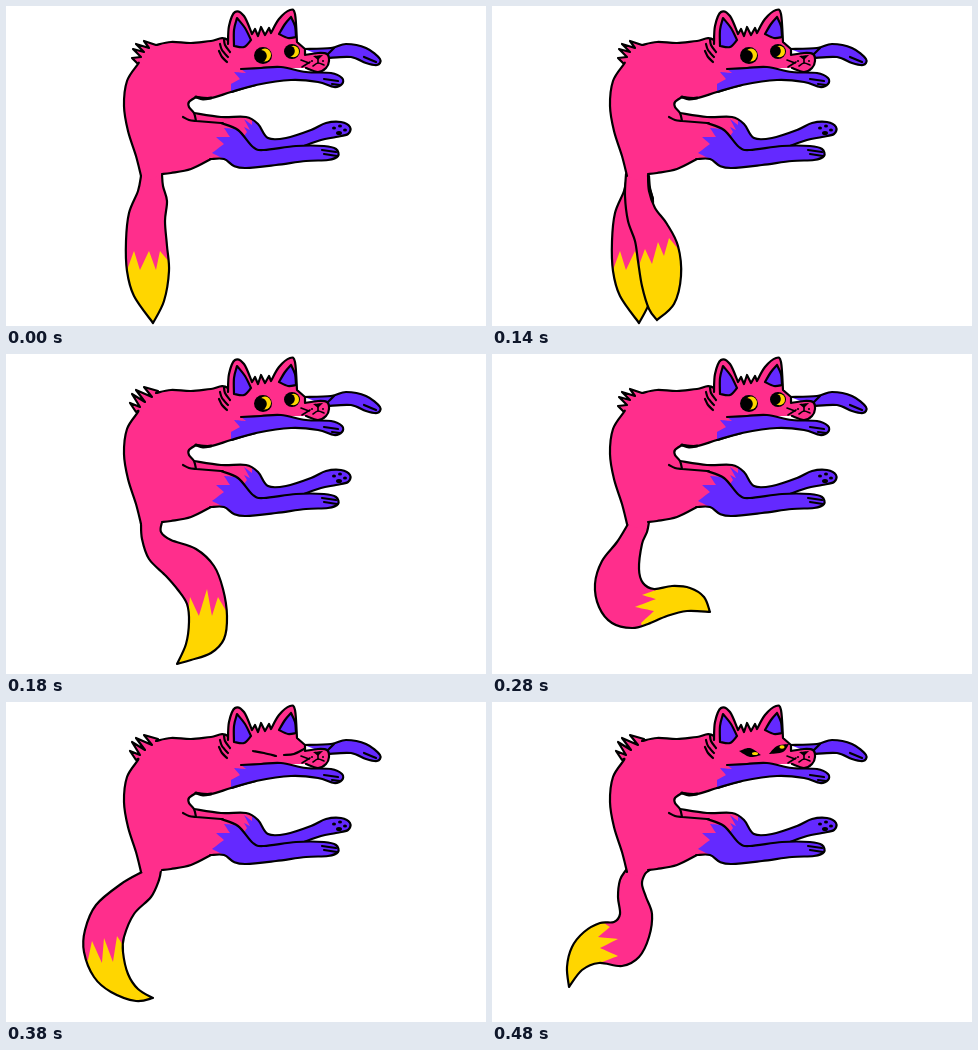
Write an HTML page with a canvas that moves like this. It is 480 px wide and 320 px high and loops after 0.58 s.

```html
<!DOCTYPE html>
<html lang="en">
<head>
<meta charset="utf-8">
<title>Stretching cat</title>
<style>
html, body { margin: 0; width: 100%; height: 100%; overflow: hidden; background: #fff; }
canvas { display: block; }
</style>
</head>
<body>
<canvas id="c" width="480" height="320"></canvas>
<script>
const g = document.getElementById('c').getContext('2d');
const PINK = '#ff2e8c', VIOLET = '#6429ff', GOLD = '#ffd600', INK = '#000';

// Smooth curve through "x y x y ..."; a slash marks a sharp corner.
function curve(text) {
  const path = new Path2D();
  let last = null;
  for (const part of text.split('/')) {
    const n = part.trim().split(/\s+/).map(Number), p = last ? [last] : [];
    for (let i = 0; i < n.length; i += 2) p.push([n[i], n[i + 1]]);
    if (!last) path.moveTo(...p[0]);
    for (let i = 0; i + 1 < p.length; i++) {
      const b = p[i], c = p[i + 1], a = p[i - 1] || b, d = p[i + 2] || c;
      path.bezierCurveTo(b[0] + (c[0] - a[0]) / 6, b[1] + (c[1] - a[1]) / 6,
        c[0] - (d[0] - b[0]) / 6, c[1] - (d[1] - b[1]) / 6, ...c);
    }
    last = p[p.length - 1];
  }
  return path;
}
function fill(text, color) {
  g.fillStyle = color;
  g.fill(curve(text));
}
function line(text, width = 2.2) {
  g.lineWidth = width;
  g.stroke(curve(text));
}
function lines(list, width) {
  for (const text of list) line(text, width);
}
function shape(text, color, width) {
  fill(text, color);
  line(text, width);
}
function dot(x, y, rx, ry, color) {
  g.fillStyle = color;
  g.beginPath();
  g.ellipse(x, y, rx, ry, 0, 0, 7);
  g.fill();
}

// Each tail is a list of [outline, coloured tip] layers, back to front.
const upright = ['135 170 132 185 123 207 120 235 121 265 128 290 147 317/158 295 163 265 161 240 159 215 161 195 157 180 156 168',
  '115 264/121 264/128 245/134 264/143 245/150 264/154 245/165 258/165 320/115 320'];
const tails = [
  [upright],
  [upright, ['134 168 133 190 136 215 143 235 146 255 150 280 157 303 165 314/182 298 189 270 186 240 175 218 163 202 157 185 156 168',
    '140 275/146 262/153 243/160 258/166 236/172 250/177 232/192 250/192 320/140 320']],
  [['135 168 136 185 143 205 160 222 172 236 181 250 183 268 180 290 171 310/185 306 205 299 218 285 221 262 217 235 208 212 190 195 165 186 155 178 156 168',
    '175 260/182 260/184 243/193 262/201 235/206 262/212 243/223 262/223 320/160 320']],
  [['136 170 125 188 110 207 103 230 107 253 120 269 140 274 156 270 175 262 195 257 218 258/212 243 198 234 180 232 162 235 151 229 147 215 150 190 155 178 157 168',
    '166 228/164 236/150 241/164 245/143 253/162 257/149 269/153 280/225 280/225 228']],
  [['136 170 115 182 90 203 79 228 78 250 88 275 105 290 130 299 147 296/132 287 122 272 117 250 118 235 128 212 145 195 153 178 155 168',
    '70 262/82 258/86 239/96 261/98 236/107 260/111 234/120 248/155 250/155 305/70 305']],
  [['134 168 128 178 126 195 128 212 122 220 108 221 92 230 80 245 75 265 77 285/90 268 107 261 130 264 147 255 157 235 160 212 154 195 150 182 153 172 158 168',
    '103 215/118 225/106 235/126 237/108 246/126 254/105 262/105 290/70 290/70 215']]
];
const tuftLow = '150 39/138 35/143 42/130 38/138 46/127 43/135 51/126 52/132 58';
const tuftHigh = '152 37/138 33/146 43/130 36/139 48/126 40/134 53/124 49/130 58';

const farArm = '298 43 325 42 340 38 360 42 374 53 371 59 360 57 345 51 322 52';
const farLeg = '188 107 215 111 240 111 252 118 262 132 280 132 305 124 320 117 335 116 344 121 342 128 330 131 315 134 298 140';
const rump = '156 168 165 167 185 163 205 153';
const leg = '205 153 218 153 228 160 240 162 270 159 300 155 322 154 332 150 330 143 318 140 290 140 258 144 247 141 232 124 215 117';
const belly = '215 117 190 115/188 107 183 101 183 96 190 91/205 92 225 86 250 79';
const back = '222 34 205 35 185 37 165 36 150 39';
const side = '132 58 121 75 118 100 122 125 130 150 135 170';
const arm = '235 63 255 62 275 61 300 66 325 67 336 72 336 78 328 81 312 76 285 74 250 79 225 86';
const skull = '222 38 223 20 229 6 238 10 246 28/249 23/252 30/255 21/259 29/263 22/265 27/273 13 284 4 289 8 291 36/299 43/299 49/312 47 321 48 323 55 320 62 312 66 300 62';

function drawTail(layers) {
  for (const [outline, tip] of layers) {
    fill(outline, PINK);
    g.save();
    g.clip(curve(outline));
    fill(tip.replace(/\s*\/\s*/g, '/'), GOLD);
    g.restore();
    line(outline);
  }
  if (layers.length > 1) line('157 170 158 182 161 193');
}

function drawBody(tuft) {
  shape(farArm, VIOLET);
  lines(['320 50 328 42', '358 51 370 56']);

  fill(farLeg + '/247 145/232 124/190 115', PINK);
  fill('252 118 262 132 280 132 305 124 320 117 335 116 344 121 342 128 330 131 315 134 298 140/247 145/238 130/241 126/238 121/244 124/238 113/246 119/246 114', VIOLET);
  line(farLeg);
  for (const [x, y] of [[328, 122], [334, 120], [339, 124]]) dot(x, y, 2, 1.6, INK);
  dot(333, 127, 3, 2, INK);

  const outline = [rump, leg, belly, '245 62', back, tuft, side].join('/');
  fill(outline + '/145 174', PINK);
  fill(leg + '/231 123/218 122/224 131/210 131/218 138/206 147/218 153', VIOLET);
  line(outline);
  line('190 115 183 114 177 111');
  line('190 91 197 93 205 92', 3);
  lines(['316 144 330 146', '318 148 331 150']);
}

function drawEyes(mood) {
  if (mood === 'closed') {
    lines(['247 49 258 51 270 54', '278 53 288 52 298 47']);
  } else if (mood === 'narrow') {
    fill('247 49 258 46 269 53/258 55 247 49', INK);
    fill('277 52 285 44 297 42/291 50 277 52', INK);
    dot(263, 51.5, 3, 1.5, GOLD);
    dot(290, 45, 2.6, 1.7, GOLD);
  } else {
    dot(257, 49.5, 9, 8.5, INK);
    dot(259, 49, 6, 6.5, GOLD);
    dot(255, 50, 5.8, 6, INK);
    dot(286, 45.5, 8, 7.5, INK);
    dot(287.5, 45.5, 5.5, 5.7, GOLD);
    dot(284, 45, 4.8, 5.2, INK);
  }
}

function drawHead(mood) {
  fill(skull + '/275 62/235 66/212 60/218 38', PINK);
  line(skull);
  shape('228 40/228 24 231 12/239 22 245 34/238 41 228 40', VIOLET);
  shape('285 11/279 18 273 28/282 32 290 31/289 20 285 11', VIOLET);
  lines(['218 33 219 39 224 46', '214 38 216 44 222 51', '213 45 216 51 221 56']);
  drawEyes(mood);
  fill('307 50/317 49/312 54', INK);
  lines(['312 52 312 57', '307 60 312 57 318 59', '295 54 303 57', '296 61 304 56'], 1.6);
  dot(306, 55, 1, 1, INK);
  dot(317, 55, 1, 1, INK);
}

function drawArm() {
  fill(arm + '/225 78/234 73/228 66/240 67', VIOLET);
  line(arm);
  lines(['318 73 332 75', '326 78 334 79']);
}

const ends = [80, 180, 280, 380, 480, 580];
const moods = ['open', 'open', 'open', 'open', 'closed', 'narrow'];
const highTuft = [0, 0, 1, 0, 1, 1];

function draw(now) {
  const t = now % 580, pose = ends.findIndex(end => t < end);
  g.fillStyle = '#fff';
  g.fillRect(0, 0, 480, 320);
  g.strokeStyle = INK;
  g.lineCap = g.lineJoin = 'round';
  drawTail(tails[pose]);
  drawBody(highTuft[pose] ? tuftHigh : tuftLow);
  drawHead(moods[pose]);
  drawArm();
}

const start = performance.now();
function tick() {
  draw(performance.now() - start);
  requestAnimationFrame(tick);
}
tick();
</script>
</body>
</html>
```
